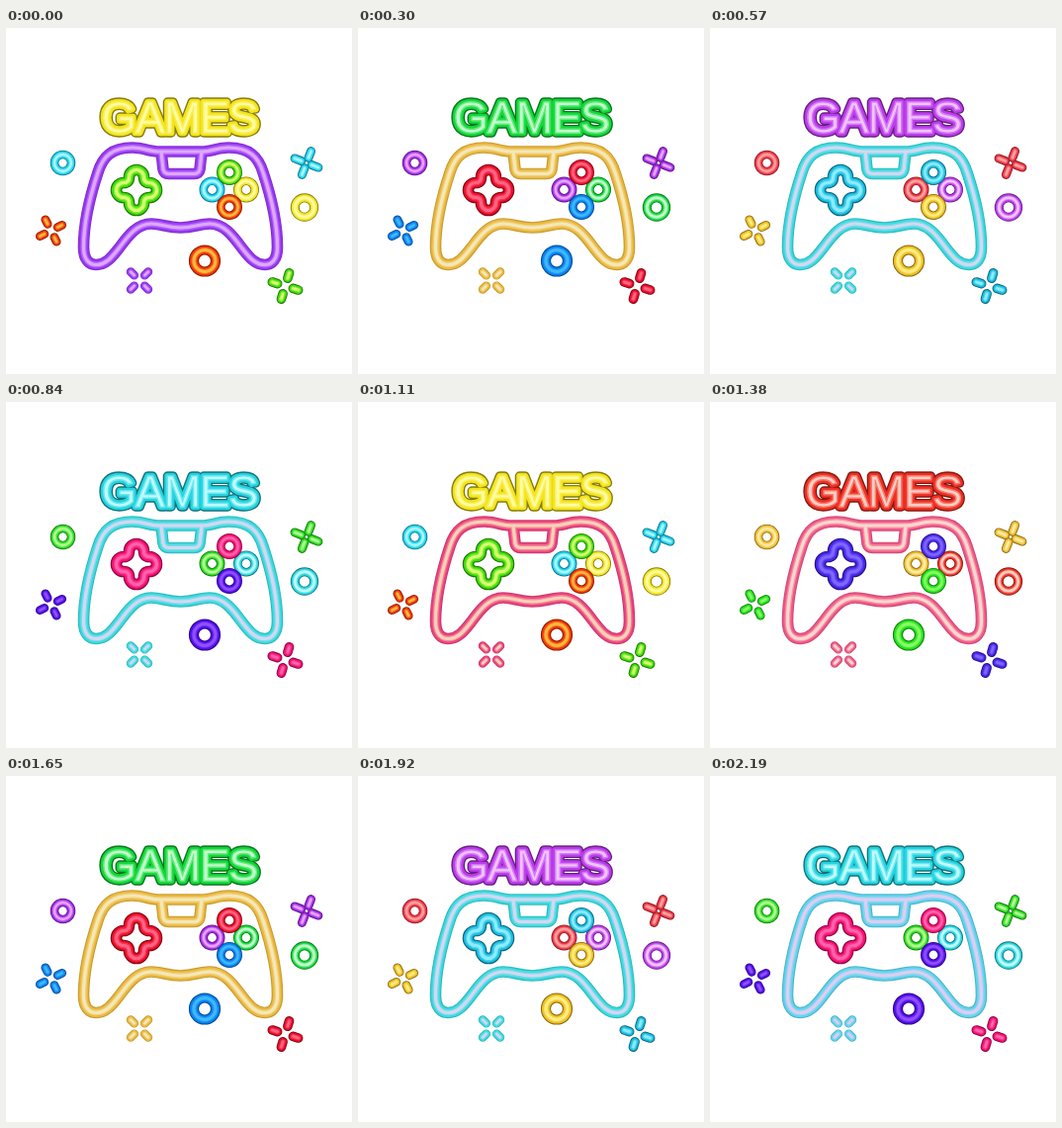
Write an HTML page that moves like this. It is 350x350 px and loops after 2460 ms.

```html
<!DOCTYPE html>
<html lang="en">
<head>
<meta charset="utf-8">
<title>Neon games</title>
<style>
  html, body { margin: 0; width: 100%; height: 100%; overflow: hidden; background: #fff; }
  svg { display: block; width: 100vw; height: 100vh; }
  .tube { fill: none; stroke-linecap: round; stroke-linejoin: round; }
  text { font: 45px "Liberation Sans", Arial, sans-serif; letter-spacing: -1px; text-anchor: middle; }
  .edge { stroke: color-mix(in srgb, var(--glow) 54%, black); }
  .body { stroke: var(--glow); }
  .soft { stroke: color-mix(in srgb, var(--glow) 55%, var(--core)); }
  .core { stroke: var(--core); }
  .pad .edge { stroke: color-mix(in srgb, var(--glow) 84%, black); }
  text.core { fill: var(--core); stroke: color-mix(in srgb, var(--glow) 55%, var(--core)); }
</style>
</head>
<body>
<svg id="stage" viewBox="0 0 350 350"></svg>
<script>
const LOOP = 2460;
const stage = document.getElementById('stage');

// Each colour is [glow, core].
const LIGHTS = {
  title: [['#f4e41c', '#fffca4'], ['#f03024', '#ffd0c4'], ['#14d83a', '#c4ffce'], ['#bd3cec', '#f0c4ff'], ['#24d4e0', '#c0fbff']],
  side:  [['#1cd0ee', '#a8f8ff'], ['#f0bc2c', '#ffeca4'], ['#a428e4', '#e4a4ff'], ['#ee3444', '#ffa0a0'], ['#28d820', '#b0ff92']],
  cross: [['#3cdc08', '#d8ff70'], ['#4a24ec', '#7c68ff'], ['#ec0c28', '#ff6484'], ['#18bce0', '#8cecff'], ['#f80c74', '#ff64aa']],
  low:   [['#f43400', '#ffb840'], ['#20e018', '#84ff64'], ['#0480f4', '#40b8ff'], ['#eebc20', '#ffee80'], ['#500cec', '#9050ff']],
};
const PAD = {
  violet: ['#9838f4', '#dea8ff'],
  rose: ['#f4588a', '#f8d8cc'],
  gold: ['#ecb83c', '#f4e8b8'],
  mint: ['#38dce0', '#d2d8f2'],
  sky: ['#5cd6ee', '#dccef2'],
  pink: ['#f04480', '#f6d2b6'],
};

// [start in ms, state]
const MAIN_STEPS = [[0, 0], [30, 1], [300, 2], [570, 3], [840, 4],
  [1110, 0], [1380, 1], [1650, 2], [1920, 3], [2190, 4]];
const PAD_STEPS = [[0, 'violet'], [30, 'rose'], [300, 'gold'], [570, 'mint'], [870, 'pink'],
  [1140, 'violet'], [1350, 'rose'], [1620, 'gold'], [1920, 'mint'], [2190, 'sky']];

const LAYERS = [['edge', 1], ['body', 0.8], ['soft', 0.5], ['core', 0.28]];

function add(parent, tag, attrs) {
  const node = document.createElementNS('http://www.w3.org/2000/svg', tag);
  for (const key in attrs) node.setAttribute(key, attrs[key]);
  return parent.appendChild(node);
}

const groups = {};
for (const name of ['pad', ...Object.keys(LIGHTS)]) groups[name] = add(stage, 'g', { class: name });

function tube(group, d, width, transform = '') {
  for (const [layer, part] of LAYERS) {
    add(groups[group], 'path', { d, class: 'tube ' + layer, 'stroke-width': width * part, transform });
  }
}

function ring(group, x, y, r, width) {
  tube(group, `M${-r} 0a${r} ${r} 0 1 1 ${2 * r} 0a${r} ${r} 0 1 1 ${-2 * r} 0z`, width, `translate(${x} ${y})`);
}

function spark(group, x, y, turn, scale, inner = 7.5) {
  for (let i = 0; i < 4; i++) {
    tube(group, `M${inner} 0H12.5`, 8.8, `translate(${x} ${y}) rotate(${turn + 90 * i}) scale(${scale})`);
  }
}

function title(word, x, y) {
  const widths = { edge: 9.4, body: 6.6, soft: 2, core: 1 };
  for (const [layer] of LAYERS) {
    add(groups.title, 'text', { x, y, class: 'tube ' + layer, 'stroke-width': widths[layer] }).textContent = word;
  }
}

title('GAMES', 175.5, 106.3);

tube('pad', 'M155 125H198C208 125 214 121 225 121C246 121 255 130 260 146' +
  'C268 170 274.5 199 274.5 222C274.5 234 269 239.5 262 239.5C252 239.5 246 232 239 223' +
  'C230 211 221 198 206 198C196 198 190 202 176.5 202C163 202 157 198 147 198' +
  'C132 198 123 211 114 223C107 232 101 239.5 91 239.5C84 239.5 78.5 234 78.5 222' +
  'C78.5 199 85 170 93 146C98 130 107 121 128 121C139 121 145 125 155 125Z' +
  'M157 125L159 143Q160 147.5 165 147.5H190Q195 147.5 196 143L198 125', 11.6);

tube('cross', 'M-7.5-13a7.5 7.5 0 0 1 15 0Q7.5-7.5 13-7.5a7.5 7.5 0 0 1 0 15Q7.5 7.5 7.5 13' +
  'a7.5 7.5 0 0 1-15 0Q-7.5 7.5-13 7.5a7.5 7.5 0 0 1 0-15Q-7.5-7.5-7.5-13z',
  11.6, 'translate(132 164)');

ring('cross', 226, 146, 8.7, 8.6);
ring('side', 208.5, 163.5, 8.7, 8.6);
ring('title', 243, 163.5, 8.7, 8.6);
ring('low', 226, 181, 8.7, 8.6);

ring('side', 57.5, 136.5, 8.5, 8.6);
ring('title', 302, 181.5, 9.7, 9);
ring('low', 201, 235.5, 11, 10.2);

spark('side', 304, 136.5, 21, 1.02, 5.5);
spark('low', 45.5, 205, -27, 1);
spark('pad', 135, 255.5, 45, 1);
spark('cross', 282.5, 261, 17, 1.1);

const stateAt = (steps, time) => steps.findLast(([start]) => start <= time)[1];

function light(name, [glow, core]) {
  groups[name].style.setProperty('--glow', glow);
  groups[name].style.setProperty('--core', core);
}

function draw() {
  const time = performance.now() % LOOP;
  const state = stateAt(MAIN_STEPS, time);
  for (const name in LIGHTS) light(name, LIGHTS[name][state]);
  light('pad', PAD[stateAt(PAD_STEPS, time)]);
  requestAnimationFrame(draw);
}
draw();
</script>
</body>
</html>
```
